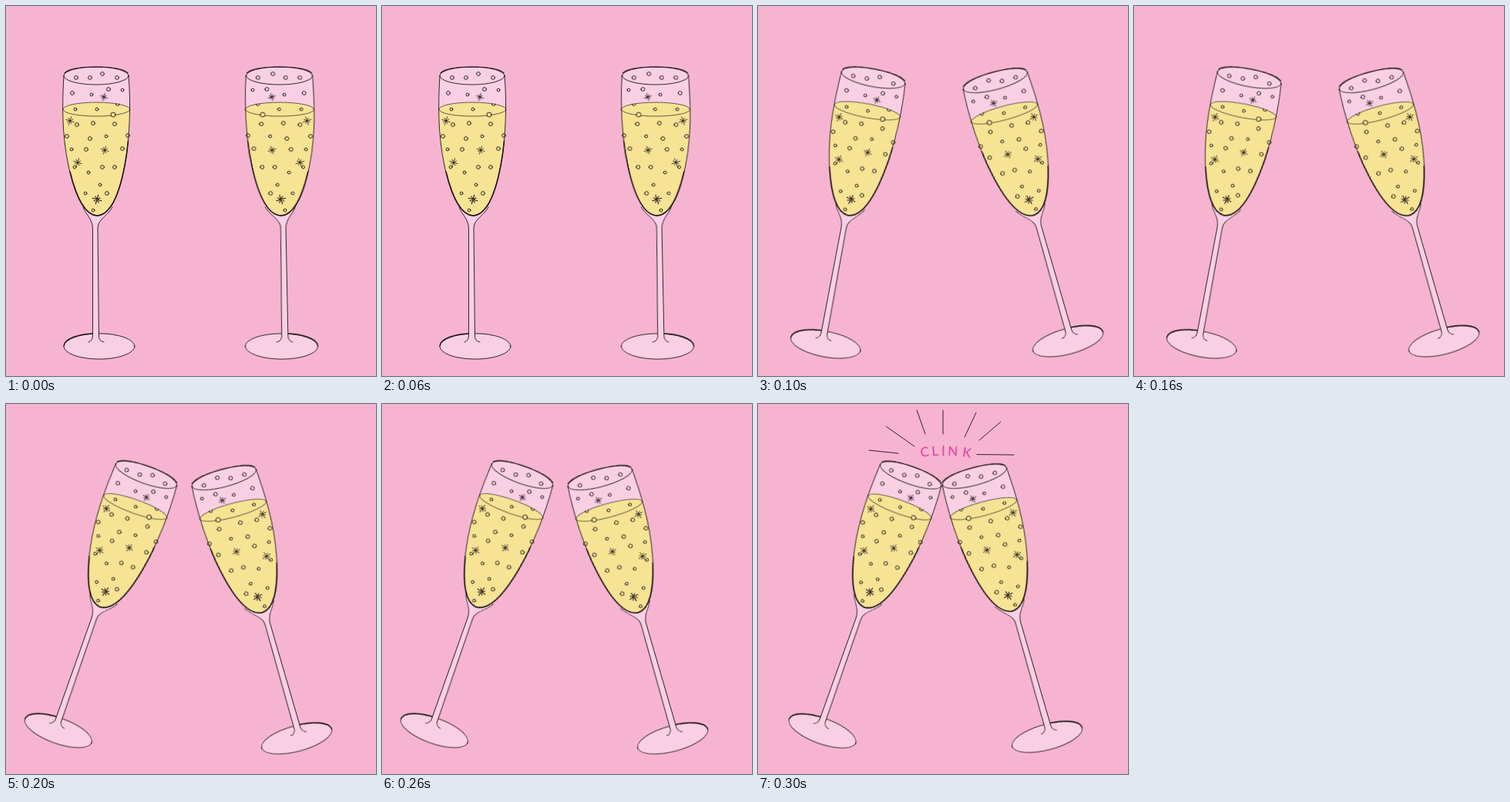
Recreate the animation shown at these times as an HTML page. Size 480 px wide and 480 px high, loop 0.4 s.

```html
<!DOCTYPE html>
<html lang="en">
<head>
<meta charset="utf-8">
<title>Clink</title>
<style>
  html, body { margin: 0; width: 100%; height: 100%; overflow: hidden; background: #f7b4d1; }
  svg { display: block; width: 100%; height: 100%; }
  .line { fill: none; stroke: #1c1418; stroke-width: .9; stroke-linecap: round; stroke-linejoin: round; }
  .thin { stroke-width: .65; }
  .bold { stroke-width: 1.5; }
  .glass { fill: #f9d0e3; }
  .wine { fill: #f6e394; }
  .left, .right, .clink { animation: .4s step-end infinite; }
  .left { transform-origin: 118px 251px; animation-name: lean-right; }
  .right { transform-origin: 358px 251px; animation-name: lean-left; }
  .clink { animation-name: flash; }
  .clink text { font: 500 17px Lato, "Open Sans", sans-serif; fill: #e2459f; text-anchor: middle; }
  @keyframes lean-right {
    0%, 100% { transform: none; }
    25% { transform: translate(2.5px, 0) rotate(10.8deg); }
    50% { transform: translate(11px, -7.5px) rotate(19.6deg); }
    75% { transform: translate(27px, -7px) rotate(19.7deg); }
  }
  @keyframes lean-left {
    0%, 100% { transform: none; }
    25% { transform: translate(-5px, 0) rotate(-15.1deg); }
    50% { transform: translate(-30px, -1px) rotate(-15.1deg); }
    75% { transform: translate(-32px, -3px) rotate(-15.1deg); }
  }
  @keyframes flash {
    0%, 100% { visibility: hidden; }
    75% { visibility: visible; }
  }
</style>
</head>
<body>
<svg viewBox="0 0 480 480">
  <defs>
    <g id="flute">
      <ellipse class="line glass" cx="121" cy="441.5" rx="46" ry="16.6"/>
      <path class="line bold" d="M75 441C76 431 96 425 117 425"/>
      <path class="glass" d="M100 261C104 271 112 276 112.500 288L112.500 428Q112 435 107 436L127 436Q121 435 120.500 429L119 288C119 277 132 272 138 261Z"/>
      <path class="line" d="M100 261C104 271 112 276 112.500 288L112.500 428Q112 435 107 436M127 436Q121 435 120.500 429L119 288C119 277 132 272 138 261"/>
      <path class="glass" d="M75 90C73 125 72 165 81 207C89 245 101 271 118 272C136 271 147 244 154 207C161 170 162 125 159 90A42 11.500 0 0 0 75 90Z"/>
      <path class="wine" d="M74 134C73.500 160 75 180 81 207C89 245 101 271 118 272C136 271 147 244 154 207C160 175 161 155 161 134A43.500 9 0 0 0 74 134Z"/>
      <path class="line" d="M75 90C73 125 72 165 81 207C89 245 101 271 118 272C136 271 147 244 154 207C161 170 162 125 159 90"/>
      <path class="line bold" d="M83 215C91 247 102 271 118 272C136 271 147 244 154 207Q157 192 158.500 175"/>
      <ellipse class="line" cx="117" cy="90.500" rx="42" ry="11.500"/>
      <path class="line bold" d="M76 87C82 80 100 79 117 79S152 81 158 87" style="stroke-width:1.2"/>
      <ellipse class="line thin" cx="117.500" cy="134" rx="43.500" ry="9"/>
      <g id="fizz"></g>
    </g>
  </defs>
  <g class="left"><use href="#flute"/></g>
  <g class="right"><use href="#flute" transform="matrix(-1.025 0 .02 1 472.6 0)"/></g>
  <g class="clink">
    <path class="line" d="M144 60L182 64M166 29L203 55M206 8L217 39M240 8V39M283 11L268 43M315 23L287 47M284 65.500L332 66"/>
    <text transform="translate(217 68) rotate(-9)">C</text>
    <text transform="translate(230 67) rotate(-4)">L</text>
    <text transform="translate(240.500 66.500)">I</text>
    <text transform="translate(252.500 67) rotate(3)">N</text>
    <text transform="translate(270 69) rotate(9)">K</text>
  </g>
</svg>
<script>
  const fizz = document.getElementById("fizz");

  function add(tag, attributes) {
    const node = document.createElementNS("http://www.w3.org/2000/svg", tag);
    for (const [key, value] of Object.entries(attributes)) node.setAttribute(key, value);
    fizz.append(node);
  }

  const bubble = r => ([cx, cy]) => add("circle", { class: "line", cx, cy, r });

  function star([x, y, size, width]) {
    let d = "";
    for (let i = 0; i < 4; i++) {
      const angle = .3 + i * Math.PI / 4;
      const reach = size * (i % 2 ? .75 : 1);
      const dx = reach * Math.cos(angle), dy = reach * Math.sin(angle);
      d += `M${x - dx} ${y - dy}L${x + dx} ${y + dy}`;
    }
    add("path", { class: "line", d, "stroke-width": width, style: `stroke-width:${width}` });
  }

  [[91, 93], [109, 93], [125, 88], [144, 93], [86, 113], [133, 108],
   [92, 154], [113, 152], [141, 153], [79, 169], [109, 172], [158, 168],
   [104, 186], [151, 185], [125, 209], [141, 209], [131, 243]].forEach(bubble(2.4));
  [[111, 115], [151, 109], [90, 134], [118, 134], [130, 169], [85, 186],
   [89, 209], [107, 216], [122, 232], [103, 243], [113, 265]].forEach(bubble(1.9));
  add("path", { class: "line", d: "M142.500 126.500A2.300 2.300 0 1 0 147 127" });
  add("circle", { class: "line wine", cx: 139, cy: 141, r: 3, style: "fill:#f6e394" });
  [[127, 118, 4.8, .8], [83, 149, 5.5, .8], [128, 187, 5.2, .8],
   [93, 203, 5.5, .8], [118, 251, 6, 1.1]].forEach(star);
</script>
</body>
</html>
```
